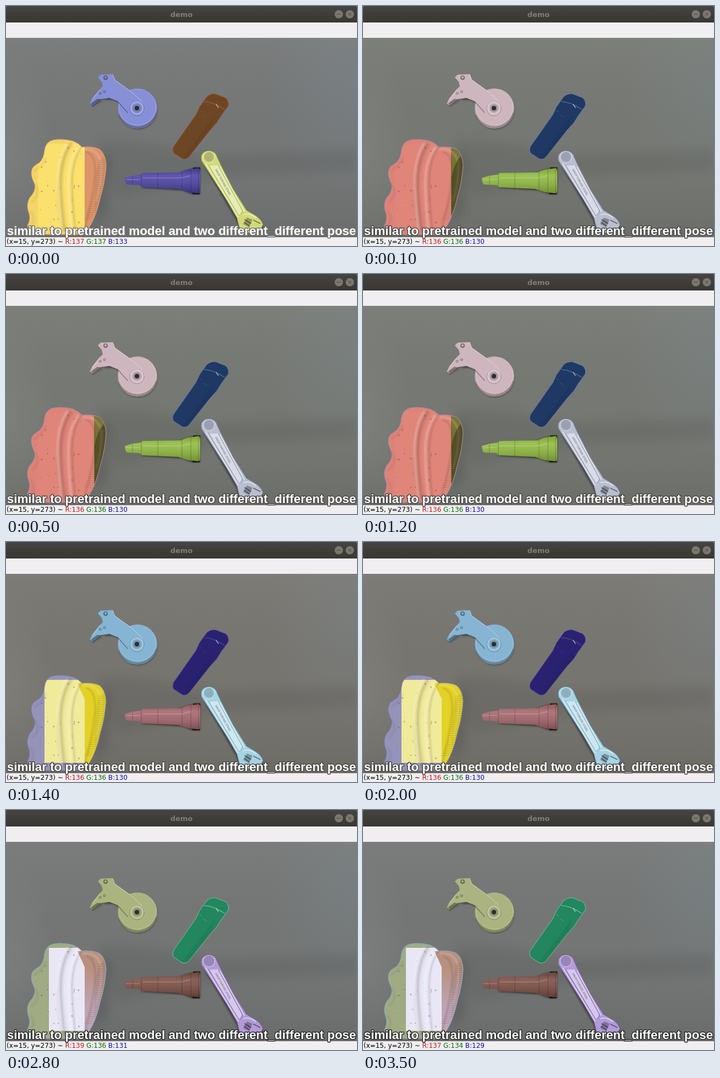
An HTML page that plays this animation: 638x437 px, repeating every 3600 ms.

```html
<!DOCTYPE html>
<html lang="en">
<head>
<meta charset="utf-8">
<title>demo</title>
<style>
  html, body { margin: 0; width: 100%; height: 100%; overflow: hidden; background: #f0eef0; }
  svg { display: block; width: 638px; height: 437px; }
  .table { fill: var(--table); }
  .roller { fill: var(--roller); }
  .torch { fill: var(--torch); stroke: var(--torchEdge); stroke-width: .8; }
  .torchLine { stroke: var(--torchEdge); }
  .cone { fill: var(--cone); }
  .wrench { fill: var(--wrench); stroke: var(--wrenchEdge); stroke-width: .8; }
  .wrenchLine { stroke: var(--wrenchEdge); }
  .left { fill: var(--left); }
  .mid { fill: var(--mid); }
  .sideTop { stop-color: var(--right); }
  .sideLow { stop-color: var(--low); }
  .rim { stroke: var(--rim); }
  .line { fill: none; stroke-linecap: round; stroke-linejoin: round; }
  .dark { stroke: #000; }
  .light { stroke: #fff; }
  .ui { font: 12px "DejaVu Sans", sans-serif; letter-spacing: -.04px; }
  .title { font: bold 13px "DejaVu Sans", sans-serif; fill: #807d78; text-anchor: middle; }
  .caption {
    font: bold 22.4px "Liberation Sans", Arial, sans-serif;
    fill: #fff; stroke: var(--captionEdge); stroke-width: 3px; stroke-linejoin: round;
    paint-order: stroke; text-anchor: middle;
  }
  .stamp { font: bold 5px "Liberation Sans", sans-serif; fill: #333; opacity: .5; }
</style>
</head>
<body>
<svg viewBox="0 0 638 437" xmlns="http://www.w3.org/2000/svg">
  <defs>
    <linearGradient id="bar" x2="0" y2="1">
      <stop stop-color="#454440"/><stop offset="1" stop-color="#383733"/>
    </linearGradient>
    <linearGradient id="depth" x2="0" y2="1">
      <stop stop-color="#fff" stop-opacity=".05"/>
      <stop offset=".45" stop-color="#888" stop-opacity="0"/>
      <stop offset="1" stop-color="#000" stop-opacity=".09"/>
    </linearGradient>
    <radialGradient id="glow">
      <stop stop-color="#fff" stop-opacity=".06"/><stop offset="1" stop-color="#fff" stop-opacity="0"/>
    </radialGradient>
    <radialGradient id="cool">
      <stop stop-color="#8199a8" stop-opacity=".18"/><stop offset="1" stop-color="#8199a8" stop-opacity="0"/>
    </radialGradient>
    <linearGradient id="round" x2="0" y2="1">
      <stop stop-color="#000" stop-opacity=".12"/>
      <stop offset=".3" stop-color="#fff" stop-opacity=".12"/>
      <stop offset="1" stop-color="#000" stop-opacity=".22"/>
    </linearGradient>
    <linearGradient id="sideFill" x2="0" y2="1">
      <stop offset=".2" class="sideTop"/><stop offset=".7" class="sideLow"/>
    </linearGradient>
    <filter id="soft" x="-40%" y="-40%" width="180%" height="180%"><feGaussianBlur stdDeviation="9"/></filter>
    <filter id="blur" x="-30%" y="-30%" width="160%" height="160%"><feGaussianBlur stdDeviation="1.6"/></filter>
    <clipPath id="view"><rect y="58" width="638" height="363"/></clipPath>
    <path id="mouldShape" d="M70 263Q72 247 86 244Q103 241 122 246Q132 250 138 257Q157 255 170 261Q181 270 182 290Q180 320 172 346Q164 383 151 403L140 416H44L39 400Q46 387 41 375Q36 362 43 349Q55 337 52 324Q44 309 47 298Q50 290 60 286Q69 278 70 263Z"/>
    <clipPath id="mouldClip"><use href="#mouldShape"/></clipPath>
    <path id="coneShape" d="M216 313L230 309L245 307L248 304L317 303L330 298L350 295Q353 296 353 301V336Q353 341 349 341L331 339L313 333L247 330L243 326L220 325Q216 322 216 313Z"/>
  </defs>

  <rect width="638" height="30" fill="#8a8986"/>
  <path d="M0 30V3Q0 0 3 0H635Q638 0 638 3V30Z" fill="url(#bar)"/>
  <text class="title" x="319" y="20">demo</text>
  <g fill="#7b7871"><circle cx="605" cy="15" r="7.6"/><circle cx="625" cy="15" r="7.6"/></g>
  <path d="M601.5 15h7M622.5 12.5l5 5M627.5 12.5l-5 5" stroke="#474540"/>
  <rect y="30" width="638" height="407" fill="#f0eef0"/>

  <g clip-path="url(#view)">
    <rect class="table" y="58" width="638" height="363"/>
    <rect y="58" width="638" height="363" fill="url(#depth)"/>
    <ellipse cx="0" cy="270" rx="90" ry="200" fill="url(#glow)"/>
    <ellipse cx="625" cy="150" rx="150" ry="190" fill="url(#cool)"/>
    <g filter="url(#soft)">
      <path d="M165 245Q260 244 370 272L638 262V300L400 308L200 350Z" opacity=".07"/>
      <path d="M172 262L190 280L184 370L160 400Z" opacity=".14"/>
    </g>

    <!-- roller -->
    <g>
      <g fill="#222" opacity=".5" filter="url(#blur)">
        <ellipse cx="240" cy="189" rx="35" ry="35.500"/>
        <path d="M157 184L173 172L194 171L210 178L190 164Z"/>
      </g>
      <ellipse class="roller" cx="239" cy="186.500" rx="36" ry="36.500"/>
      <ellipse cx="239" cy="186.500" rx="36" ry="36.500" fill="#000" opacity=".12"/>
      <ellipse class="roller" cx="239" cy="184.500" rx="34.500" ry="33"/>
      <ellipse class="line light" cx="239" cy="184" rx="34" ry="33" opacity=".25"/>
      <path class="line dark" d="M205 199Q216 221 242 221Q266 217 273 195" opacity=".3" stroke-width="1.3"/>
      <path class="roller" d="M167 130L172 125L194 124L198 134L230 157L248 173Q256 185 247 196Q234 206 222 195L203 174L188 168L173 170L165 177L158 183L152 178L157 168L169 153L176 146L174 138Z"/>
      <path class="line light" d="M194 125L198 135L230 158L247 174M157 170L170 154" opacity=".4"/>
      <path class="line dark" d="M153 178L158 183L173 170L188 168L203 174L221 194" opacity=".35" stroke-width="1.4"/>
      <path d="M155 177L166 169L173 170L158 183Z" fill="#222" opacity=".45"/>
      <circle cx="181" cy="130.500" r="4" fill="#222" opacity=".5"/>
      <circle cx="181" cy="130" r="2" class="roller"/>
      <g class="line dark" opacity=".4"><circle cx="171" cy="159" r="2"/><circle cx="179" cy="156" r="2"/></g>
      <circle class="line dark" cx="238" cy="187" r="13" opacity=".2"/>
      <circle class="roller" cx="238" cy="186" r="12"/>
      <circle class="line light" cx="238" cy="186" r="11" opacity=".4" stroke-width="1.500"/>
      <circle cx="238" cy="186" r="7" fill="#000" opacity=".3"/>
      <circle cx="238" cy="186" r="4" fill="#292f36"/>
      <circle class="line light" cx="238" cy="186" r="5.500" opacity=".4"/>
    </g>

    <!-- hand torch -->
    <path class="torch" d="M365 165Q372 159 381 160L399 167Q406 173 404 182L391 200L383 213L371 226L334 273Q328 281 320 278L305 268Q301 263 305 255L345 198L352 183Z"/>
    <path d="M374 222L333 274Q328 280 320 277L380 198Z" opacity=".05"/>
    <path class="line torchLine" d="M361 174Q378 175 397 188" stroke-width="1.4" opacity=".7"/>
    <path class="line light" d="M382 179l4 6" stroke-width="1.4" opacity=".55"/>
    <path class="line torchLine" d="M352 190l4 3M359 198l5 4" opacity=".5"/>

    <!-- cone torch -->
    <path d="M330 298L348 294H353V343H338L320 336L245 331Z" fill="#161616" opacity=".6" filter="url(#blur)"/>
    <path d="M340 294h13v8h-13zM336 337h16v6h-12z" fill="#171717"/>
    <use href="#coneShape" class="cone"/>
    <use href="#coneShape" fill="url(#round)"/>
    <path class="line dark" d="M230 310v15M246 306v23M276 304v26M320 303v32M336 298v40M350 297v42" opacity=".25"/>
    <path class="line light" d="M249 313H319L335 309M219 316H243" opacity=".2" stroke-width="1.500"/>

    <!-- wrench -->
    <path d="M359 289L418 389L425 407H468L465 395L437 373Z" fill="#111" opacity=".45" filter="url(#blur)"/>
    <path class="wrench" d="M355 275Q356 265 368 264Q381 264 384 276L391 291L413 334L437 372L452 381Q463 387 467 398L462 408L452 404L448 413L432 412L424 402L420 386L401 353L359 287Q354 281 355 275Z"/>
    <path d="M370 291L385 290L429 372L424 383Z" fill="#fff" opacity=".45"/>
    <path class="line light" d="M389 293L433 374M363 287L422 384M432 380Q442 376 454 385" stroke-width="1.6" opacity=".6"/>
    <path class="line wrenchLine" d="M368 290L423 381Q429 380 430 373L386 291" opacity=".8"/>
    <circle class="wrench" cx="369" cy="275" r="9"/>
    <circle cx="369" cy="275" r="8" fill="#55595f" opacity=".3"/>
    <circle class="line light" cx="369" cy="275" r="10.500" opacity=".5"/>
    <path d="M438 385L448 389L442 403L431 397Z" fill="#222" opacity=".35"/>
    <path class="line dark" d="M434 389l11 7M433 394l9 6M450 390l12 6" opacity=".5" stroke-width="1.500"/>
    <text class="stamp" transform="translate(380 298) rotate(61)">DROP FORGED STEEL</text>

    <!-- mould -->
    <g clip-path="url(#mouldClip)">
      <use href="#mouldShape" class="left"/>
      <rect id="patch" class="mid" y="251" height="151"/>
      <path id="side" fill="url(#sideFill)"/>
      <path d="M123 253Q104 278 104 330Q106 373 113 410H100Q90 367 93 326Q96 275 112 250Z" opacity=".06" filter="url(#blur)"/>
      <g filter="url(#blur)">
        <path class="line dark" d="M118 250Q98 279 99 330Q101 373 106 410M137 257Q121 277 120 323Q121 367 126 409" stroke-width="3" opacity=".14"/>
        <path class="line light" d="M111 251Q92 279 94 330Q96 373 101 410M131 258Q113 280 113 324Q114 367 119 409" stroke-width="4" opacity=".25"/>
        <path class="line dark" d="M52 300Q65 293 72 277M53 326Q64 342 48 356M45 375Q55 386 45 402" stroke-width="4" opacity=".06"/>
        <path class="line dark" d="M146 266Q164 270 162 308Q157 356 143 405" stroke-width="2" opacity=".18"/>
        <path class="line light" d="M140 261Q166 258 173 285Q175 315 164 354" stroke-width="2" opacity=".3"/>
      </g>
      <path id="hollow" d="M179 272Q166 284 161 313V382Q178 350 184 296Z"/>
      <g id="ridges" class="line dark" opacity=".12"></g>
      <g id="specks" fill="#6b3429" opacity=".38"></g>
    </g>
    <use href="#mouldShape" class="line rim"/>
  </g>

  <text class="caption" x="319" y="417">similar to pretrained model and two different_different pose</text>
  <text class="ui" x="1" y="433">(x=15, y=273) ~ <tspan id="red" fill="#d01818"></tspan> <tspan id="green" fill="#087008"></tspan> <tspan id="blue" fill="#1010c0"></tspan></text>
</svg>
<script>
const LOOP = 3600;
const $ = id => document.getElementById(id);

// Mask colours; x0..x1 is the middle patch of the mould, side the top left of its right part.
const masks = [
  { at: 0, x0: 58, x1: 143, side: 143, hollow: .04, table: "#757777", roller: "#8790d6", torch: "#6d4725", torchEdge: "#a85c45",
    cone: "#4a40a2", wrench: "#d2da7c", wrenchEdge: "#9fae43", left: "#f3d568", mid: "#fbe06e", right: "#dc946b", low: "#dc946b",
    rim: "#e5a568", captionEdge: "#747472" },
  { at: 100, x0: 58, x1: 160, side: 160, hollow: .3, table: "#767873", roller: "#ceb6bf", torch: "#203864", torchEdge: "#5a82ad",
    cone: "#8fb93d", wrench: "#b9bed0", wrenchEdge: "#858aae", left: "#dd8379", mid: "#df8579", right: "#7b7436", low: "#7b7436",
    rim: "#b28aaa", captionEdge: "#4a4a48" },
  { at: 1400, x0: 70, x1: 143, side: 130, hollow: .03, table: "#777570", roller: "#86b5d3", torch: "#2a2270", torchEdge: "#5254a0",
    cone: "#a4646b", wrench: "#a8d3e3", wrenchEdge: "#6ba8c6", left: "#9693ba", mid: "#f0ea9b", right: "#e3d128", low: "#e3d128",
    rim: "#7e84bd", captionEdge: "#4a4a48" },
  { at: 2800, x0: 78, x1: 143, side: 130, hollow: .05, table: "#747675", roller: "#abb480", torch: "#22865e", torchEdge: "#87cabb",
    cone: "#7a4c42", wrench: "#b29bd8", wrenchEdge: "#775aa5", left: "#a0ab84", mid: "#e9e7f6", right: "#b8907f", low: "#c0a4b4",
    rim: "#88afd0", captionEdge: "#2c2c2c" }
];

const readings = [
  { at: 0, rgb: [137, 137, 133] },
  { at: 100, rgb: [136, 136, 130] },
  { at: 2100, rgb: [139, 136, 131] },
  { at: 3000, rgb: [137, 134, 129] }
];

function addPath(parent, d) {
  const path = document.createElementNS("http://www.w3.org/2000/svg", "path");
  path.setAttribute("d", d);
  parent.append(path);
}

let seed = 17;
const random = () => (seed = seed * 16807 % 2147483647) / 2147483647;

for (let i = 0; i < 30; i++) {
  const x = 52 + random() * 88, y = 256 + random() * 138, r = .6 + random() * 1.2;
  addPath($("specks"), `M${x} ${y}l${r} ${-r}l${r} ${r * 1.6}l${-r} ${r}Z`);
}
for (let i = 0; i < 28; i++) {
  const y = 280 + i * 4, x = 174 - i * i * .035;
  addPath($("ridges"), `M${x - 7} ${y + 1}L${x + 7} ${y}`);
}

const current = (steps, time) => steps.findLast(step => step.at <= time);
let shownMask, shownReading;

function showMask(mask) {
  for (const [name, value] of Object.entries(mask))
    if (typeof value === "string") document.documentElement.style.setProperty("--" + name, value);
  $("patch").setAttribute("x", mask.x0);
  $("patch").setAttribute("width", mask.x1 - mask.x0);
  $("side").setAttribute("d", `M${mask.side} 257H184V404H${mask.x1}V286Z`);
  $("hollow").setAttribute("opacity", mask.hollow);
}

function showReading({ rgb }) {
  ["red", "green", "blue"].forEach((id, i) => $(id).textContent = "RGB"[i] + ":" + rgb[i]);
}

function draw() {
  const time = performance.now() % LOOP;
  const mask = current(masks, time), reading = current(readings, time);
  if (mask !== shownMask) showMask(shownMask = mask);
  if (reading !== shownReading) showReading(shownReading = reading);
  requestAnimationFrame(draw);
}
draw();
</script>
</body>
</html>
```
